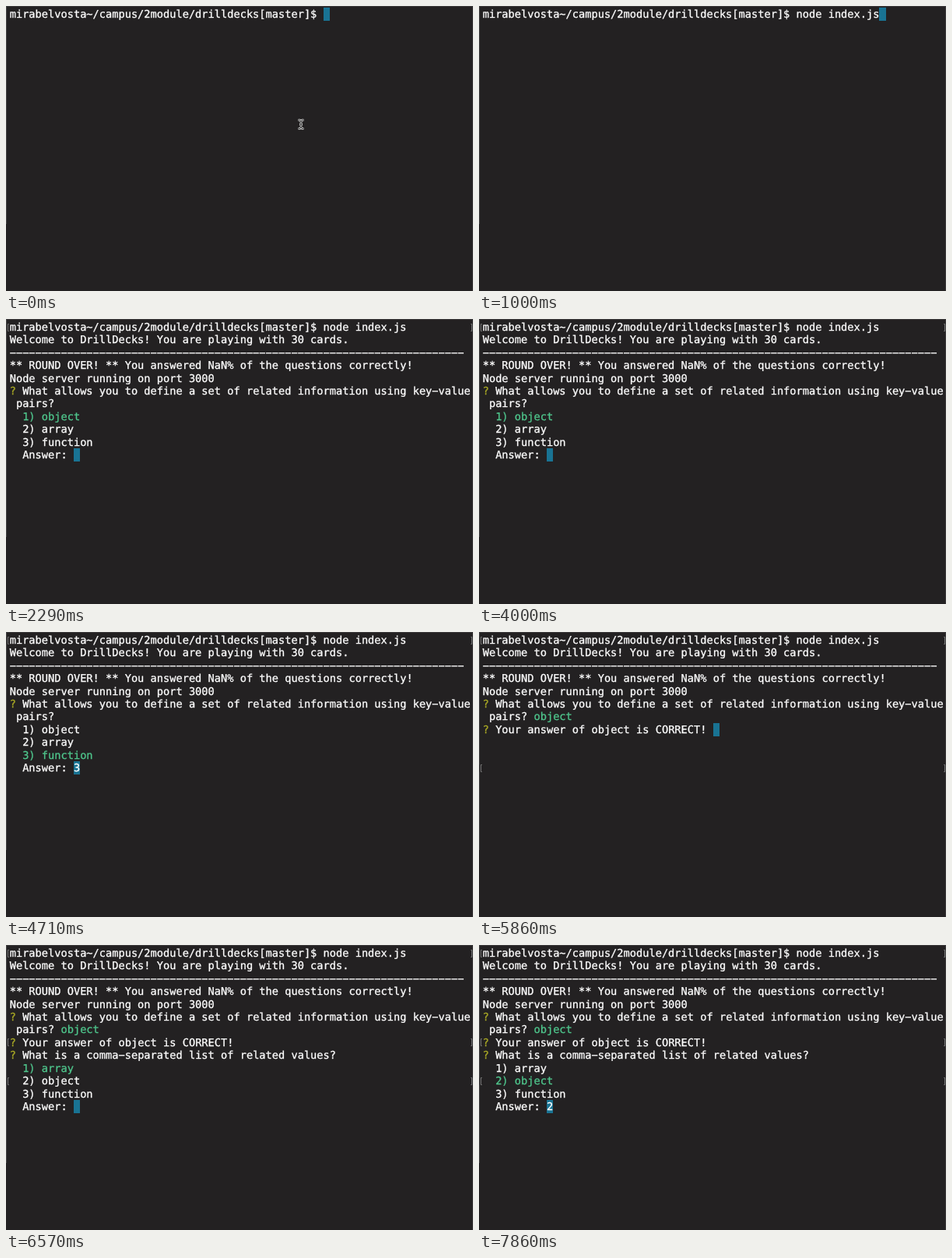
Recreate the animation shown at these times as an HTML page. Size 600 by 366 pixels, loop 8000 ms.

```html
<!DOCTYPE html>
<html lang="en">
<head>
<meta charset="utf-8">
<title>Terminal quiz</title>
<style>
  html, body { margin: 0; width: 100%; height: 100%; overflow: hidden; background: #232122; }
  #stage { position: relative; width: 600px; height: 366px; overflow: hidden;
    box-shadow: inset 0 1px #3c3b3c, inset -1px 0 #3c3b3c; }
  #stage::before { content: ""; position: absolute; width: 1px; height: 280px; background: #454445; }
  pre { position: absolute; left: 4.7px; top: 3.05px; margin: 0; color: #fff;
    font: 13.665px/16.4px "DejaVu Sans Mono", monospace; text-rendering: geometricPrecision;
    -webkit-text-stroke: .3px; }
  .green { color: #4fc78d; }
  .mark { color: #a9a925; }
  .cursor { background: #197393; padding-top: .7px; }
  .bracket { position: absolute; left: 2px; width: 595px; height: 10px;
    border: solid #777; border-width: 0 1px; }
  .bracket::before, .bracket::after { content: ""; position: absolute; width: 2px; height: 8px;
    border: solid #666; border-width: 1px 0; }
  .bracket::before { left: -1px; }
  .bracket::after { right: -1px; }
  svg { position: absolute; left: 373px; top: 144px; fill: none; }
</style>
</head>
<body>
<div id="stage">
  <pre id="screen"></pre>
  <div id="brackets"></div>
  <svg id="pointer" width="12" height="16">
    <path d="M2.5 2.5H4.5L6 4L7.5 2.5H9.5M6 4V12M4 8H8M2.5 13.5H4.5L6 12L7.5 13.5H9.5"
      stroke="#ddd" stroke-width="2.6"/>
    <path d="M3 2.5H4.5L6 4L7.5 2.5H9M6 4V12M4.5 8H7.5M3 13.5H4.5L6 12L7.5 13.5H9" stroke="#222"/>
  </svg>
</div>
<script>
const LOOP = 8000;
const ROW = 16.4;
const TIMES = { type: 1000, enter: 2000, quiz: 2290, second: 4430, third: 4710, wrap: 5000,
  result: 5860, next: 6290, pick: 7710 };
const $ = id => document.getElementById(id);
const span = (name, text) => `<span class="${name}">${text}</span>`;
const green = text => span("green", text);
const cursor = (text = " ") => span("cursor", text);
const ask = text => span("mark", "?") + " " + text;

const prompt = "mirabelvosta~/campus/2module/drilldecks[master]$ ";
const command = "node index.js";
const intro = [
  "Welcome to DrillDecks! You are playing with 30 cards.",
  "\u2212".repeat(71),
  "** ROUND OVER! ** You answered NaN% of the questions correctly!",
  "Node server running on port 3000",
  ask("What allows you to define a set of related information using key\u2212value")
];

// The typed number appears only once a choice has been made.
function menu(options, choice) {
  const items = options.map((option, i) => {
    const label = `${i + 1}) ${option}`;
    return "  " + (i + 1 === (choice || 1) ? green(label) : label);
  });
  return [...items, "  Answer: " + cursor(choice || " ")];
}

function linesAt(t) {
  if (t < TIMES.type) return [prompt + cursor()];
  if (t < TIMES.enter) return [prompt + command + cursor()];
  const lines = [prompt + command];
  if (t < TIMES.quiz) return [...lines, cursor()];
  lines.push(...intro);
  if (t < TIMES.result) {
    const choice = t < TIMES.second ? 0 : t < TIMES.third ? 2 : t < TIMES.wrap ? 3 : 1;
    return [...lines, " pairs?", ...menu(["object", "array", "function"], choice)];
  }
  lines.push(" pairs? " + green("object"));
  const verdict = ask("Your answer of object is CORRECT! ");
  if (t < TIMES.next) return [...lines, verdict + cursor()];
  return [...lines, verdict,
    ask("What is a comma\u2212separated list of related values?"),
    ...menu(["array", "object", "function"], t < TIMES.pick ? 0 : 2)];
}

function bracketsAt(t) {
  const rows = [[0, TIMES.enter], [10, TIMES.result], [7, TIMES.next]];
  return rows.filter(([, start]) => t >= start)
    .map(([row]) => `<div class="bracket" style="top:${5.5 + row * ROW}px"></div>`).join("");
}

let shown = "";
function draw(now) {
  const t = now % LOOP;
  const text = linesAt(t).join("\n");
  if (text !== shown) {
    $("screen").innerHTML = shown = text;
    $("brackets").innerHTML = bracketsAt(t);
    $("pointer").style.display = t < TIMES.type ? "" : "none";
  }
  requestAnimationFrame(draw);
}
draw(0);
</script>
</body>
</html>
```
